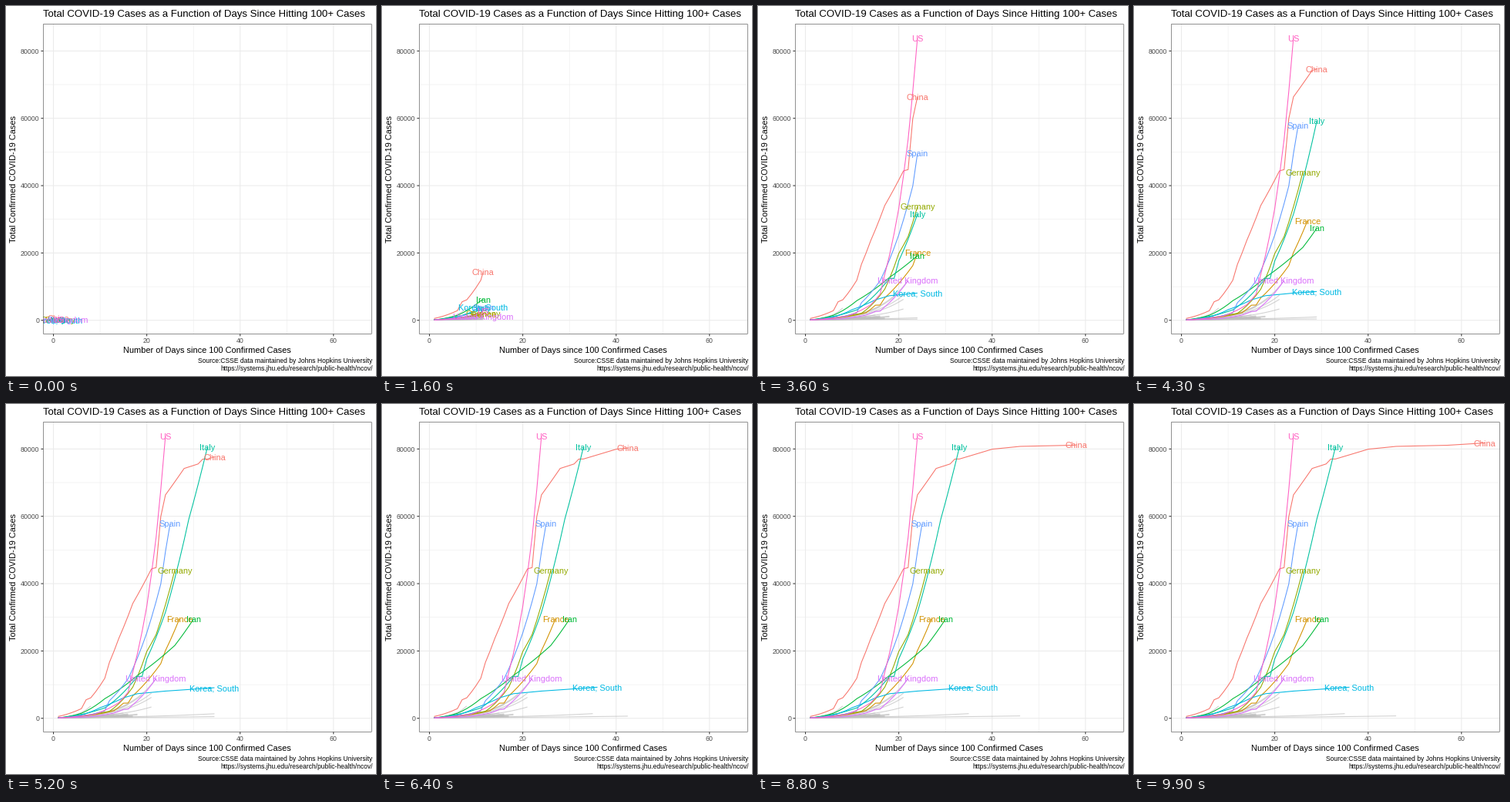
Write a matplotlib script that moves like this. It is 480x480 px and loops after 10000 ms.

```python
import matplotlib.pyplot as plt
import numpy as np
from matplotlib.animation import FuncAnimation
from matplotlib.patches import Rectangle

plt.rcParams["font.family"] = "Liberation Sans"

SIZE, DPI = 480, 80
PX = 72 / DPI  # points per pixel
FRAMES, LAST_DAY = 100, 65
LEFT, RIGHT, TOP, BOTTOM = 48.2, 474.5, 23.3, 425.6
X_MIN, X_MAX = -2.2, 68.2
Y_MIN, Y_MAX = -4087, 88023
THIN, THICK = 0.535, 1.07


def px(day):
    return LEFT + (np.asarray(day) - X_MIN) / (X_MAX - X_MIN) * (RIGHT - LEFT)


def py(cases):
    return BOTTOM - (np.asarray(cases) - Y_MIN) / (Y_MAX - Y_MIN) * (BOTTOM - TOP)


fig = plt.figure(figsize=(SIZE / DPI, SIZE / DPI), dpi=DPI, facecolor="white")
ax = fig.add_axes([0, 0, 1, 1])
ax.set_xlim(0, SIZE)
ax.set_ylim(SIZE, 0)
ax.axis("off")


def stroke(xs, ys, color, width, z, **kw):
    line, = ax.plot(xs, ys, color=color, lw=width * PX, zorder=z, snap=False,
                    solid_capstyle="butt", solid_joinstyle="round", **kw)
    return line


def label(x, y, text, size, color="black", ha="center", **kw):
    return ax.text(x, y, text, fontsize=size * PX, color=color, ha=ha,
                   va="baseline", **kw)


def draw_axes():
    for day in range(0, 70, 10):
        x, major = px(day), day % 20 == 0
        stroke([x, x], [TOP, BOTTOM], "#EBEBEB", THICK if major else THIN, 1)
        if major:
            stroke([x, x], [BOTTOM, BOTTOM + 2.75], "#333333", THICK, 1)
            label(x, 437, str(day), 8.8, "#4D4D4D")
    for cases in range(0, 90000, 10000):
        y, major = py(cases), cases % 20000 == 0
        stroke([LEFT, RIGHT], [y, y], "#EBEBEB", THICK if major else THIN, 1)
        if major:
            stroke([LEFT - 2.75, LEFT], [y, y], "#333333", THICK, 1)
            label(LEFT - 5, y + 3.2, str(cases), 8.8, "#4D4D4D", "right")
    inset = THIN / 2
    ax.add_patch(Rectangle(
        (LEFT + inset, TOP + inset), RIGHT - LEFT - THIN, BOTTOM - TOP - THIN,
        fill=False, ec="#333333", lw=THIN * PX, snap=False, zorder=6))

    mid_x, mid_y = (LEFT + RIGHT) / 2, (TOP + BOTTOM) / 2
    label(LEFT, 14, "Total COVID-19 Cases as a Function of Days Since "
          "Hitting 100+ Cases", 13.28, ha="left")
    label(mid_x, 450, "Number of Days since 100 Confirmed Cases", 11)
    label(13, mid_y, "Total Confirmed COVID-19 Cases", 11,
          rotation=90, rotation_mode="anchor")
    label(475.7, 463, "Source:CSSE data maintained by Johns Hopkins University",
          8.55, ha="right")
    label(475.7, 473, "https://systems.jhu.edu/research/public-health/ncov/",
          8.55, ha="right")


draw_axes()
panel = Rectangle((LEFT, TOP), RIGHT - LEFT, BOTTOM - TOP, fill=False, lw=0)
ax.add_patch(panel)

# Each day lands on a whole frame; the head moves linearly between them.
DAYS = np.arange(1, LAST_DAY + 1)
DAY_FRAMES = np.round((DAYS - 1) * (FRAMES - 1) / (LAST_DAY - 1))


class Series:
    def __init__(self, values, color, name=None, z=3, **kw):
        self.values = values
        self.days = DAYS[:len(values)]
        self.line = stroke([], [], color, THICK, z, **kw)
        self.tag = None
        if name:
            self.tag = label(0, 0, name, 11, color, zorder=5, clip_on=True)
            self.tag.set_clip_path(panel)

    def show(self, now):
        head = min(now, self.days[-1])
        value = np.interp(head, self.days, self.values)
        past = self.days < head
        self.line.set_data(px(np.append(self.days[past], head)),
                           py(np.append(self.values[past], value)))
        if self.tag:
            self.tag.set_position((px(head), py(value) + 4))


def country(name, color, *points):
    """Daily totals through key (day, cases) points, with quadratic growth."""
    days, cases = np.transpose(points)
    roots = np.interp(np.arange(1, days[-1] + 1), days, np.sqrt(cases))
    return Series(roots ** 2, color, name)


def background(length, final):
    """Growth from about 100 cases that slows down with time."""
    t = np.linspace(0, 1, length)
    return Series(105 * (final / 105) ** t ** 0.7, "#BEBEBE", z=2, alpha=0.7)


rng = np.random.default_rng(19)
outliers = [(46, 712), (35, 1387), (22, 11811), (21, 7468), (21, 6235),
            (19, 6909), (21, 3369), (16, 4042), (8, 3629)]
series = [background(*o) for o in outliers]
series += [background(rng.integers(6, 19), 300 * 9 ** rng.random())
           for _ in range(30)]

series += [
    country("China", "#F8766D", (1, 548), (6, 2877), (7, 5509), (8, 6087),
            (11, 11891), (12, 16630), (14, 23707), (17, 34110), (21, 44386),
            (22, 44759), (23, 59895), (24, 66358), (28, 74211), (31, 75550),
            (32, 77001), (33, 77022), (40, 79932), (46, 80770), (57, 81102),
            (65, 81782)),
    country("France", "#D39200", (1, 100), (9, 1136), (13, 2293), (15, 4496),
            (16, 4532), (17, 6683), (23, 16243), (24, 20123), (27, 29551)),
    country("Germany", "#93AA00", (1, 130), (12, 2078), (17, 9257),
            (20, 19848), (22, 24873), (26, 43938)),
    country("Iran", "#00BA38", (1, 139), (6, 1501), (11, 5823), (18, 12729),
            (26, 21638), (30, 29406)),
    country("Italy", "#00C19F", (1, 155), (11, 3089), (16, 9172), (18, 12462),
            (19, 12462), (20, 17660), (24, 31506), (29, 59138), (33, 80589)),
    country("Korea, South", "#00B9E3", (1, 104), (6, 977), (10, 3150),
            (15, 6088), (18, 7314), (24, 8086), (36, 9241)),
    country("Spain", "#619CFF", (1, 120), (8, 1073), (11, 2277), (12, 5232),
            (16, 11748), (18, 17963), (20, 25374), (23, 39885), (24, 49515),
            (25, 57786)),
    country("United Kingdom", "#DB72FB", (1, 116), (8, 459), (13, 1551),
            (15, 2642), (16, 2716), (17, 4014), (22, 11812)),
    country("US", "#FF61C3", (1, 118), (9, 1281), (14, 4632), (16, 7783),
            (17, 13677), (20, 33276), (22, 53740), (24, 83836)),
]


def update(frame):
    now = np.interp(frame, DAY_FRAMES, DAYS)
    for s in series:
        s.show(now)
    return []


anim = FuncAnimation(fig, update, frames=FRAMES, interval=100,
                     init_func=lambda: update(0), repeat=True, repeat_delay=0)
plt.show()
```
